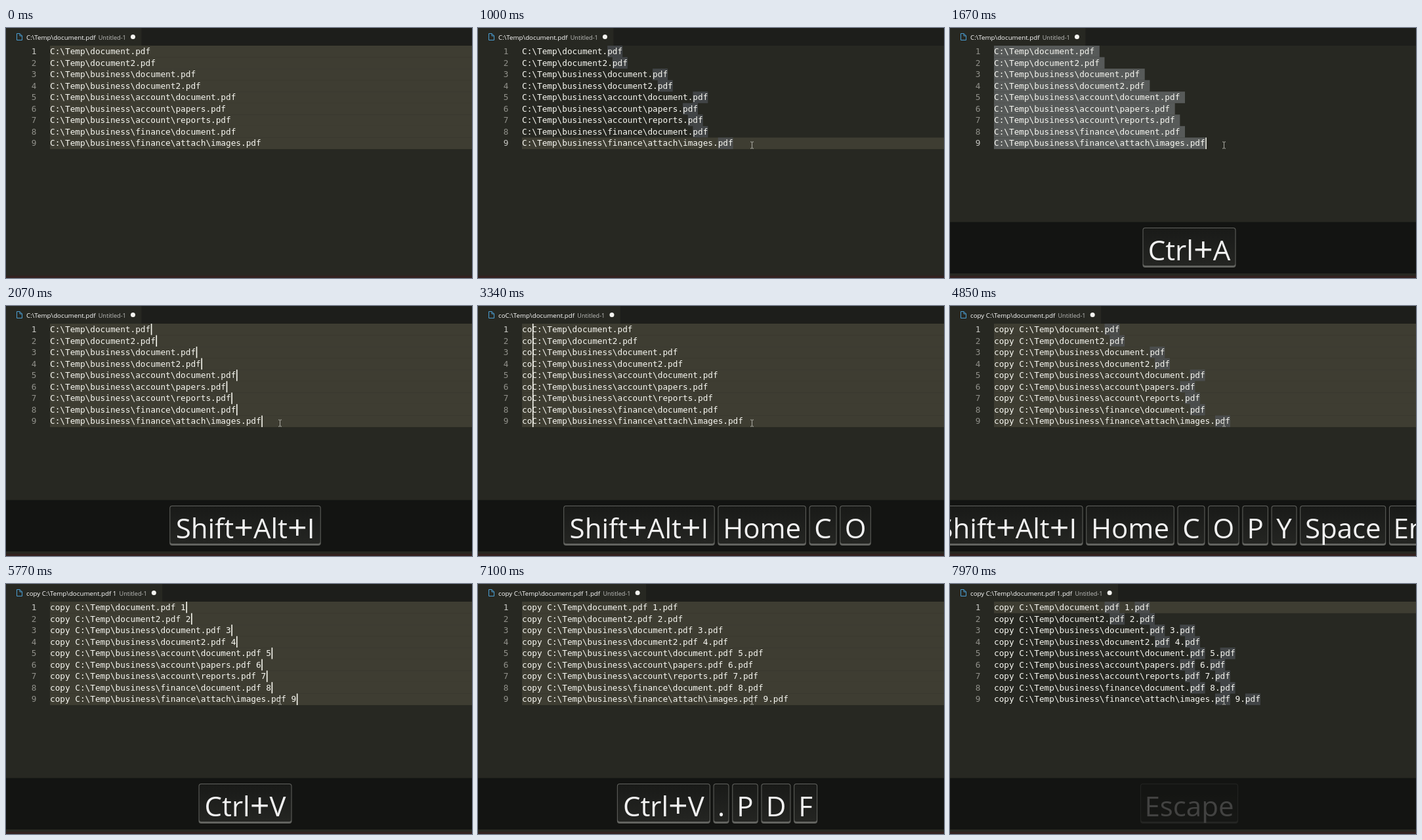
These frames come from a looping animation (710 by 382 pixels, 8000 ms). An HTML page:

```html
<!DOCTYPE html>
<html lang="en">
<head>
<meta charset="utf-8">
<title>Multi-cursor editing</title>
<style>
html, body { margin: 0; width: 100%; height: 100%; overflow: hidden; background: #272822; }
svg { display: block; width: 710px; height: 382px; }
text { white-space: pre; }
.code { font: 12.72px "DejaVu Sans Mono", monospace; fill: #f8f8f2; }
.num { fill: #90908a; text-anchor: end; }
.num.on { fill: #c8c8c4; }
.tab { font-family: "Open Sans", "Noto Sans", sans-serif; fill: #fff; }
.key { font: 42px "Open Sans", "Noto Sans", sans-serif; fill: #f2f2f2; text-anchor: middle; }
.plus { font-size: 52px; }
</style>
</head>
<body>
<svg viewBox="0 0 710 382">
  <defs>
    <linearGradient id="keyFill" x2="0" y2="1">
      <stop stop-color="#191a18"/><stop offset="1" stop-color="#242522"/>
    </linearGradient>
  </defs>
  <rect width="710" height="382" fill="#272822"/>
  <rect width="710" height="27" fill="#1d1e1b"/>
  <rect id="tabBack" height="27" fill="#272822"/>
  <path d="M16.5 8.5h4.5l3.500 3.500v6.500h-8zM21 8.500v3.500h3.500" fill="none" stroke="#4a9fd4"/>
  <text id="title" class="tab" x="31" y="17.500" font-size="9.750"></text>
  <text id="subtitle" class="tab" y="17.500" font-size="9.100" opacity=".7">Untitled-1</text>
  <circle id="dot" cy="13.500" r="3.500" fill="#f4f4f0"/>
  <g id="editor"></g>
  <path id="mouse" d="M-2.500-5h2l.500.500.500-.500h2M0-4.500v9M-2.500 5h2l.500-.500.500.500h2" fill="none" stroke="#b9b9b2" stroke-width=".9"/>
  <rect y="378.500" width="710" height="3.500" fill="#33211f"/>
  <g id="overlay">
    <rect y="296.500" width="710" height="78.500" fill="#131412"/>
    <g id="keys"></g>
  </g>
</svg>
<script>
const LOOP = 8000, LEFT = 67, TOP = 27, ROW = 17.55, COL = 7.658;
const KEY_GAP = 4.7, KEY_CENTER = 364.5;
const KEY_WIDTH = {
  'Ctrl+A': 142, 'Ctrl+V': 142, 'Shift+Alt+I': 230.5, Home: 134.5, End: 88, Space: 131, Escape: 149,
  C: 42, O: 47.5, P: 39.5, Y: 39, D: 45, F: 36, '.': 24
};
const PATHS = [
  'document', 'document2', 'business\\document', 'business\\document2',
  'business\\account\\document', 'business\\account\\papers', 'business\\account\\reports',
  'business\\finance\\document', 'business\\finance\\attach\\images'
].map(p => `C:\\Temp\\${p}.pdf`);
const PDF = /pdf/g, DRIVE = /C(?=:)/g;
const $ = id => document.getElementById(id);

// Each step changes some fields of the editor state; the rest carries over.
const steps = [];
let latest = { head: '', tail: '', rows: 'all', at: 'end', caret: false, mark: null, select: false, keys: [] };
function step(time, change) {
  latest = { ...latest, ...change, time };
  steps.push(latest);
}
// A keystroke shows the carets, drops the word marks and adds its key to the overlay.
function press(time, key, change = {}) {
  step(time, { caret: true, mark: null, keys: [...latest.keys, key], fade: 0, ...change });
}
function pressFresh(time, key, fade, change) {
  press(time, key, { keys: [key], fade, fadeBand: false, ...change });
}

step(0, {});
step(530, { rows: 8, caret: true });
step(800, { mark: PDF });
step(1000, { caret: false });
pressFresh(1390, 'Ctrl+A', 280, { select: true, fadeBand: true });
pressFresh(1870, 'Shift+Alt+I', 200, { select: false, rows: 'all' });
press(2550, 'Home', { at: 'start' });
step(2860, { mark: DRIVE });
press(3070, 'C', { head: 'c', at: 'head' });
press(3340, 'O', { head: 'co' });
press(3610, 'P', { head: 'cop' });
press(3800, 'Y', { head: 'copy' });
press(4250, 'Space', { head: 'copy ' });
press(4390, 'End', { at: 'end' });
step(4590, { mark: PDF });
step(4850, { caret: false });
pressFresh(5100, 'Space', 200, { tail: ' ', fadeBand: true });
pressFresh(5570, 'Ctrl+V', 200, { tail: ' #' });
press(6180, '.', { tail: ' #.' });
press(6520, 'P', { tail: ' #.p' });
press(6620, 'D', { tail: ' #.pd' });
press(6720, 'F', { tail: ' #.pdf' });
step(7100, { caret: false });
pressFresh(7380, 'Escape', 130, { rows: 0 });
step(7760, { mark: PDF });
step(7970, { caret: false });

const lineText = (s, i) => s.head + PATHS[i] + s.tail.replace('#', i + 1);
const block = (col, row, width, style) =>
  `<rect x="${LEFT + col * COL}" y="${TOP + row * ROW}" width="${width}" height="${ROW + .1}" ${style}/>`;

function drawLine(s, i) {
  const text = lineText(s, i);
  const hasCursor = s.rows === 'all' || s.rows === i;
  const cursorCol = { start: 0, head: s.head.length, end: text.length }[s.at];
  const base = TOP + 13 + i * ROW;
  const current = s.rows === 'all' ? i === 0 : s.rows === i;
  let out = '';
  if (hasCursor && !s.select) out += block(0, i, 710 - LEFT, 'fill="#3e3d32"');
  if (s.select) out += block(0, i, (text.length + (i < 8)) * COL, 'fill="#575a59"');
  if (s.mark) {
    for (const m of text.matchAll(s.mark))
      out += block(m.index, i, m[0].length * COL, 'fill="#575c64" fill-opacity=".55"');
  }
  out += `<text class="code num${current ? ' on' : ''}" x="46.5" y="${base}">${i + 1}</text>`;
  out += `<text class="code" x="${LEFT}" y="${base}">${text}</text>`;
  if (hasCursor && s.caret) out += block(cursorCol + .08, i, 1.6, 'fill="#f8f8f0"');
  return out;
}

function drawKeys(keys) {
  const total = keys.reduce((sum, k) => sum + KEY_WIDTH[k] + KEY_GAP, -KEY_GAP);
  let x = KEY_CENTER - total / 2;
  return keys.map(k => {
    const w = KEY_WIDTH[k];
    const label = k.replace(/\+(.)/g, '<tspan class="plus" dy="2">+</tspan><tspan dy="-2">$1</tspan>');
    const out = `<rect x="${x}" y="305" width="${w}" height="61" rx="4" fill="#62635f"/>
      <rect x="${x + 1}" y="306" width="${w - 2}" height="57" rx="3" fill="url(#keyFill)"/>
      <text class="key" x="${x + w / 2}" y="354.5">${label}</text>`;
    x += w + KEY_GAP;
    return out;
  }).join('');
}

function drawState(s) {
  $('editor').innerHTML = PATHS.map((_, i) => drawLine(s, i)).join('');
  $('keys').innerHTML = drawKeys(s.keys);
  $('overlay').style.display = s.keys.length ? '' : 'none';
  $('title').textContent = lineText(s, 0).trim();
  const end = 31 + $('title').getComputedTextLength();
  $('subtitle').setAttribute('x', end + 4.3);
  $('dot').setAttribute('cx', end + 57);
  $('tabBack').setAttribute('width', end + 70);
}

let shown = null;
function render(t) {
  const s = steps.findLast(e => e.time <= t);
  if (s !== shown) drawState(shown = s);

  const fade = s.fade ? Math.min(1, .2 + .8 * (t - s.time) / s.fade) : 1;
  $('overlay').setAttribute('opacity', s.fadeBand ? fade : 1);
  $('keys').setAttribute('opacity', s.fadeBand ? 1 : fade);

  const move = Math.min(1, Math.max(0, (t - 130) / 400));
  const rest = (1 - move) ** 2;
  $('mouse').setAttribute('transform', `translate(${417.5 + 70 * rest} ${179 + 205 * rest})`);
  $('mouse').style.display = t < 130 ? 'none' : '';
}

const begin = performance.now();
function tick() {
  render((performance.now() - begin) % LOOP);
  requestAnimationFrame(tick);
}
tick();
</script>
</body>
</html>
```
